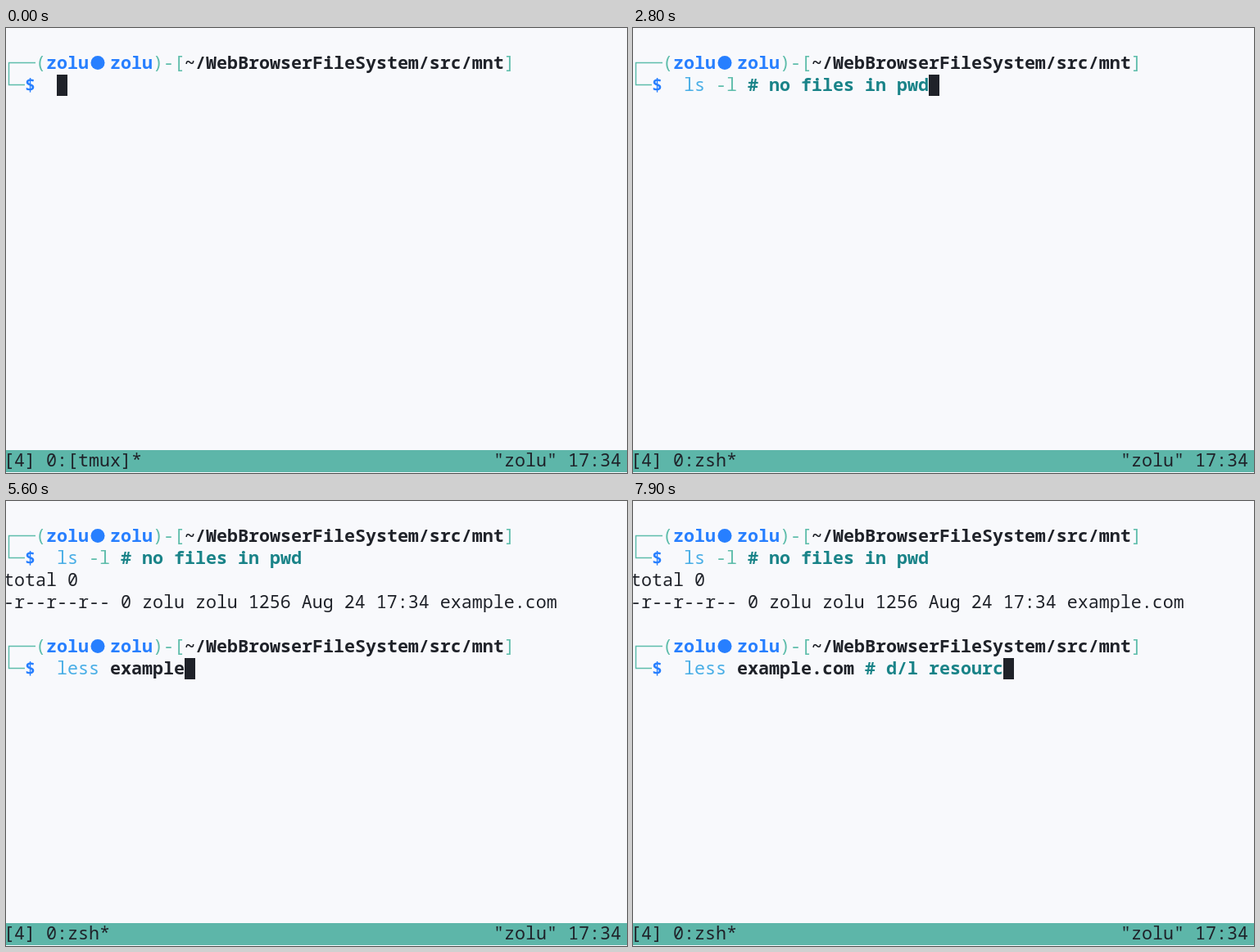
Animation, 758 px wide and 544 px high, one loop 8000 ms. Source, as an HTML page with a canvas:

```html
<!DOCTYPE html>
<html lang="en">
<head>
<meta charset="utf-8">
<title>Terminal session</title>
<style>
  html, body { margin: 0; width: 100%; height: 100%; overflow: hidden; background: #f8f9fc; }
  canvas { display: block; }
</style>
</head>
<body>
<canvas id="screen" width="758" height="544"></canvas>
<script>
const ctx = document.getElementById('screen').getContext('2d');
const LOOP = 8000, CELL = 13, ROW = 27, LEFT = -3, TOP = 3;
const USER = 'zolu';
const color = {
  paper: '#f8f9fc', ink: '#1f2229', blue: '#277fff', green: '#5ebdab',
  command: '#49aee6', comment: '#198388', bar: '#5db6a9'
};

// Segments: [text, color, bold]
const lsLine = [['ls ', color.command], ['-l ', color.green], ['# no files in pwd', color.comment, true]];
const lessLine = [['less ', color.command], ['example.com ', color.ink, true], ['# d/l resourc', color.comment, true]];

// Typing progress: [time, characters]
const lsKeys = [[500, 1], [1700, 10], [2800, 23]];
const lessKeys = [[4400, 1], [4700, 4], [5600, 12], [6900, 20], [7900, 30]];
const STATUS_CHANGE = 500, ENTER = 3300;

const colX = col => LEFT + col * CELL;
const rowY = row => TOP + row * ROW;

function write(text, col, row, fill, bold) {
  ctx.font = `${bold ? 700 : 400} 21.67px "Noto Sans Mono", monospace`;
  ctx.fillStyle = fill;
  ctx.fillText(text, colX(col), rowY(row) + 20);
}

function typedCount(keys, t) {
  if (t < keys[0][0]) return 0;
  const next = keys.findIndex(([time]) => time > t);
  if (next < 0) return keys[keys.length - 1][1];
  const [t0, n0] = keys[next - 1], [t1, n1] = keys[next];
  return Math.floor(n0 + (n1 - n0) * (t - t0) / (t1 - t0) + 1e-6);
}

function writeSegments(segments, count, row) {
  let col = 5;
  for (const [text, fill, bold] of segments) {
    const part = text.slice(0, Math.max(0, count));
    write(part, col, row, fill, bold);
    col += part.length;
    count -= text.length;
  }
}

function drawPrompt(row) {
  const y = rowY(row) + 12.5;
  ctx.strokeStyle = color.green;
  ctx.lineWidth = 1.5;
  ctx.beginPath();
  ctx.moveTo(colX(3), y);
  ctx.lineTo(3.5, y);
  ctx.lineTo(3.5, y + ROW);
  ctx.lineTo(colX(2), y + ROW);
  ctx.stroke();

  write('(', 3, row, color.green);
  write(USER, 4, row, color.blue, true);
  ctx.beginPath();
  ctx.arc(colX(8) + 11, y, 8.5, 0, Math.PI * 2);
  ctx.fill();
  write(USER, 10, row, color.blue, true);
  write(')-[', 14, row, color.green);
  write('~/WebBrowserFileSystem/src/mnt', 17, row, color.ink, true);
  write(']', 47, row, color.green);
  write('$', 2, row + 1, color.blue, true);
}

function drawCursor(col, row) {
  ctx.fillStyle = color.ink;
  ctx.fillRect(colX(col), rowY(row), CELL, 26);
}

function drawStatus(t) {
  ctx.fillStyle = color.bar;
  ctx.fillRect(0, rowY(19), 758, ROW);
  write(`[4] 0:${t < STATUS_CHANGE ? '[tmux]' : 'zsh'}*`, 0, 19, color.ink);
  write(`"${USER}" 17:34`, 46, 19, color.ink);
}

function render(t) {
  ctx.fillStyle = color.paper;
  ctx.fillRect(0, 0, 758, 544);
  drawStatus(t);
  drawPrompt(1);
  const lsCount = typedCount(lsKeys, t);
  writeSegments(lsLine, lsCount, 2);
  if (t < ENTER) {
    drawCursor(5 + lsCount, 2);
    return;
  }
  write('total 0', 0, 3, color.ink);
  write(`-r--r--r-- 0 ${USER} ${USER} 1256 Aug 24 17:34 example.com`, 0, 4, color.ink);
  drawPrompt(6);
  const lessCount = typedCount(lessKeys, t);
  writeSegments(lessLine, lessCount, 7);
  drawCursor(5 + lessCount, 7);
}

const start = performance.now();
function tick() {
  render((performance.now() - start) % LOOP);
  requestAnimationFrame(tick);
}
tick();
</script>
</body>
</html>
```
